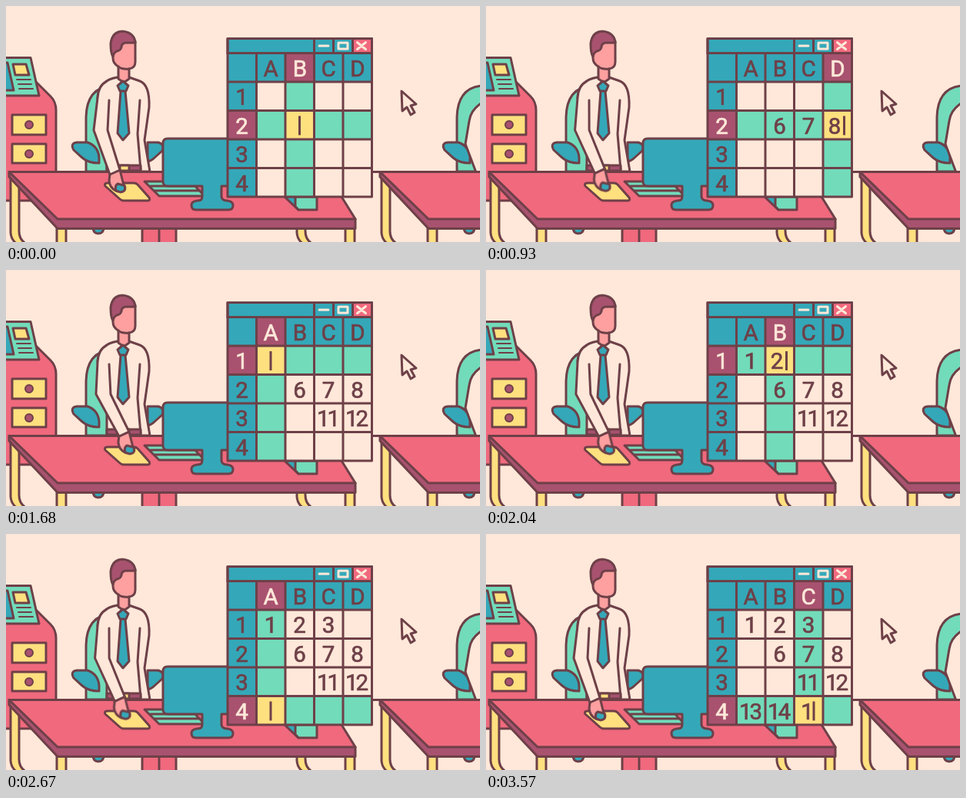
Animation of 616x308 px, one loop 3600 ms. Source, as an HTML page without scripts:

```html
<!DOCTYPE html>
<html lang="en">
<head>
<meta charset="utf-8">
<title>Office spreadsheet</title>
<style>
  @property --slot { syntax: "<number>"; inherits: true; initial-value: 0; }
  @property --typed { syntax: "<number>"; inherits: true; initial-value: 0; }
  @property --col { syntax: "<number>"; inherits: true; initial-value: 1; }
  @property --row { syntax: "<number>"; inherits: true; initial-value: 1; }
  @property --caret { syntax: "<number>"; inherits: true; initial-value: 9; }

  :root {
    --paper: #ffe8d9; --ink: #6e4048; --red: #f0697d; --teal: #34a8b8;
    --mint: #72dbba; --yellow: #ffe07f; --plum: #a8526f; --skin: #ff a0a0;
    --skin: #fda09f; --tone: var(--ink);
    --loop: 3.6s; --cell: 37.5px;
  }
  html, body { margin: 0; width: 100%; height: 100%; overflow: hidden; background: var(--paper); }
  svg { display: block; }
  .stage { width: 100%; height: 100%; stroke: var(--ink); stroke-width: 3; stroke-linejoin: round; stroke-linecap: round; fill: none; }
  .paper { fill: var(--paper); } .red { fill: var(--red); } .teal { fill: var(--teal); }
  .mint { fill: var(--mint); } .yellow { fill: var(--yellow); } .plum { fill: var(--plum); }
  .skin { fill: var(--skin); } .flat { stroke: none; } .light { stroke: var(--paper); }

  text { font: 29.5px Roboto, "Open Sans", sans-serif; fill: var(--tone); stroke: var(--tone); stroke-width: .7; text-anchor: middle; }
  .picked { --tone: var(--paper); }

  /* Each of the eleven slots fills one cell. */
  .sheet {
    animation: slot var(--loop) steps(11) infinite,
               cell var(--loop) step-end infinite,
               typed calc(var(--loop) / 11) step-end infinite;
  }
  .column { transform: translateX(calc(var(--col) * var(--cell))); }
  .column .strip { transform: translateX(calc(var(--col) * -1 * var(--cell))); }
  .row { transform: translateY(calc(var(--row) * var(--cell))); }
  .row .strip { transform: translateY(calc(var(--row) * -1 * var(--cell))); }
  .active { transform: translate(calc((var(--col) + 1) * var(--cell)), calc((var(--row) + 1) * var(--cell))); }
  .caret { transform: translateX(calc(var(--typed) * var(--caret) * 1px)); }
  .draft text { opacity: calc(var(--typed) * clamp(0, 1 - max(var(--slot) - var(--i), var(--i) - var(--slot)), 1)); }
  .done text { opacity: clamp(0, var(--slot) - var(--i), 1); }
  .pair { letter-spacing: -3.2px; }

  @keyframes slot { from { --slot: 0; } to { --slot: 11; } }
  @keyframes typed { 0% { --typed: 0; } 23%, 100% { --typed: 1; } }
  @keyframes cell {
    0% { --col: 1; --row: 1; --caret: 9; }
    9.09% { --col: 2; --row: 1; --caret: 9; }
    18.18% { --col: 3; --row: 1; --caret: 9; }
    27.27% { --col: 2; --row: 2; --caret: 7; }
    36.36% { --col: 3; --row: 2; --caret: 7; }
    45.45% { --col: 0; --row: 0; --caret: 7; }
    54.54% { --col: 1; --row: 0; --caret: 9; }
    63.63% { --col: 2; --row: 0; --caret: 9; }
    72.72% { --col: 0; --row: 3; --caret: 7; }
    81.81% { --col: 1; --row: 3; --caret: 7; }
    90.9%, 100% { --col: 2; --row: 3; --caret: 7; }
  }

  .sleeve, .hand { animation: calc(var(--loop) / 2) ease-in-out infinite alternate; }
  .sleeve { animation-name: reach; }
  .hand { animation-name: slide; }
  @keyframes reach {
    from { d: path("M130 99Q120 104 119 120L114 162L135 220L148 214L132 162L134 123"); }
    to { d: path("M130 99Q120 104 119 120L117 162L147 217L160 211L136 162L134 123"); }
  }
  @keyframes slide { to { transform: translate(12px, -3px); } }
</style>
</head>
<body>
<svg class="stage" viewBox="0 0 616 308">
  <defs>
    <g id="chair">
      <path class="mint" d="M104 216V145Q105 107 136 104H160V216Z"/>
      <path class="teal" d="M92 178H106Q120 183 121 198V205Q107 205 99 198L88 188Q83 179 92 178Z"/>
    </g>
    <path id="back-leg" class="yellow" d="M6 220V296Q7 308 19 313H32Q17 308 17 294V220Z"/>
    <g id="desk">
      <path class="teal" d="M113 288Q113 297 120 297Q127 297 127 288Z"/>
      <use href="#back-leg"/>
      <use href="#back-leg" x="372"/>
      <path class="yellow" d="M66 284H78V312H66ZM441 284H453V312H441Z"/>
      <path class="plum" d="M4 216.5V223L67 290.5H454V278Z"/>
      <path class="red" d="M4 216.5H416L454 278H67Z"/>
    </g>
    <g id="letters"><text x="56" y="30">A</text><text x="94" y="30">B</text><text x="131" y="30">C</text><text x="169" y="30">D</text></g>
    <g id="digits"><text x="18.5" y="67.5">1</text><text x="18.5" y="105">2</text><text x="18.5" y="142.5">3</text><text x="18.5" y="180">4</text></g>
  </defs>

  <path d="M0 216.5H616"/>

  <!-- cabinet -->
  <path class="red" d="M-4 94H34L58 118Q65 125 65 136V254H-4Z"/>
  <path class="mint" d="M-4 67.5H32L43 117H-4Z"/>
  <path class="teal" d="M-4 74H2L10 110H-4Z"/>
  <path class="yellow" d="M9 76H26L30 90H12Z"/>
  <path stroke-width="2" d="M14 96H32M16 102H33M17 108H35"/>
  <path class="yellow" d="M8 142H52V168H8ZM8 180H52V205H8Z"/>
  <g class="plum" stroke-width="2"><circle cx="30" cy="155" r="5"/><circle cx="30" cy="193" r="5"/></g>

  <!-- worker -->
  <use href="#chair"/>
  <path class="teal" d="M184 178H198Q207 181 203 189L193 198Q189 202 184 203Z"/>
  <path class="red" d="M177 286H221V312H177ZM199 286V312"/>
  <path class="paper" d="M145 93Q120 97 119 120L131 160V216H187L180 175L186 132Q187 103 174 98L160 93Z"/>
  <path d="M174 123L171 167L175 214"/>
  <path class="plum" d="M131 208H175V215H131Z"/>
  <path class="yellow" d="M148 208H160V215H148Z"/>
  <path class="skin" d="M139 58V68Q139 75 146 79V95L153 100L160 95V82Q168 81 168 73V46H148Z"/>
  <path d="M146 79Q150 83 160 82"/>
  <path class="plum" d="M139 66Q136 62 136 49Q138 33 152 33Q167 35 168 48H155Q150 49 150 54Q149 58 144 59Q140 61 139 66Z"/>
  <path class="teal" d="M149 111H155L160 166L152 175L145 166ZM145 104L152 98L159 104L156 111H148Z"/>

  <!-- neighbour -->
  <use href="#chair" x="482"/>
  <path class="paper" d="M622 124Q604 134 602 150L597 180L612 220H622Z"/>

  <use href="#desk"/>
  <use href="#desk" x="482"/>

  <path class="yellow" d="M132 231H166Q169 231 171 233L186 250Q188 254 184 254H153Q150 254 148 252L129 235Q127 231 132 231Z"/>
  <path class="mint" d="M180 229H240L258 248H199ZM188 235H246M193 241H252"/>
  <path class="mint" d="M364 249H404V266H380Z"/>
  <path class="teal" d="M362 249H376V262L380 266Z"/>
  <path class="teal" d="M210 173H330V235H280V249Q281 254 287 254Q295 255 295 260Q295 266 289 266H247Q241 266 241 260Q241 255 249 254Q255 254 255 249V235H210Q204 235 204 229V179Q204 173 210 173Z"/>

  <g class="hand">
    <path class="teal" d="M136 231Q139 242 149 243Q157 242 154 234L146 230Z"/>
    <path class="skin" d="M135 219L148 214L153 234L145 232Q141 235 143 241Q135 238 134 228Z"/>
  </g>
  <path class="paper sleeve" d="M130 99Q120 104 119 120L114 162L135 220L148 214L132 162L134 123"/>

  <!-- spreadsheet window -->
  <path class="teal" d="M288 42.5H475.5V61.5H288Z"/>
  <path class="red" d="M450.5 42.5H475.5V61.5H450.5Z"/>
  <path d="M400.5 42.5V61.5M425.5 42.5V61.5"/>
  <path class="light" d="M407 52H419M432 48H444V56H432ZM456.5 47.5L467.5 56.5M467.5 47.5L456.5 56.5"/>

  <g class="sheet" transform="translate(288 61.5)">
    <g class="flat">
      <path class="teal" d="M0 0H187.5V37.5H37.5V187.5H0Z"/>
      <path class="paper" d="M37.5 37.5H187.5V187.5H37.5Z"/>
    </g>
    <use href="#letters"/>
    <use href="#digits"/>

    <g class="column picked">
      <path class="mint flat" d="M37.5 37.5H75V187.5H37.5Z"/>
      <path class="plum flat" d="M37.5 0H75V37.5H37.5Z"/>
      <svg x="37.5" width="37.5" height="37.5" viewBox="37.5 0 37.5 37.5">
        <use class="strip" href="#letters"/>
      </svg>
    </g>
    <g class="row picked">
      <path class="mint flat" d="M37.5 37.5H187.5V75H37.5Z"/>
      <path class="plum flat" d="M0 37.5H37.5V75H0Z"/>
      <svg y="37.5" width="37.5" height="37.5" viewBox="0 37.5 37.5 37.5">
        <use class="strip" href="#digits"/>
      </svg>
    </g>

    <g class="active">
      <path class="yellow flat" d="M0 0H37.5V37.5H0Z"/>
      <path class="caret" d="M18.5 7V32" stroke-linecap="butt"/>
      <g class="draft">
        <text x="15" y="30" style="--i:0">6</text>
        <text x="15" y="30" style="--i:1">7</text>
        <text x="15" y="30" style="--i:2">8</text>
        <text x="17" y="30" style="--i:3">1</text>
        <text x="17" y="30" style="--i:4">1</text>
        <text x="17" y="30" style="--i:5">1</text>
        <text x="15" y="30" style="--i:6">2</text>
        <text x="15" y="30" style="--i:7">3</text>
        <text x="17" y="30" style="--i:8">1</text>
        <text x="17" y="30" style="--i:9">1</text>
        <text x="17" y="30" style="--i:10">1</text>
      </g>
    </g>

    <g class="done">
      <text x="93.5" y="105" style="--i:0">6</text>
      <text x="131" y="105" style="--i:1">7</text>
      <text x="168.5" y="105" style="--i:2">8</text>
      <text class="pair" x="129.5" y="142.5" style="--i:3">11</text>
      <text class="pair" x="166.5" y="142.5" style="--i:4">12</text>
      <text x="56" y="67.5" style="--i:5">1</text>
      <text x="93.5" y="67.5" style="--i:6">2</text>
      <text x="131" y="67.5" style="--i:7">3</text>
      <text class="pair" x="54.5" y="180" style="--i:8">13</text>
      <text class="pair" x="91.5" y="180" style="--i:9">14</text>
    </g>

    <path d="M0 0H187.5V187.5H0ZM37.5 0V187.5M75 0V187.5M112.5 0V187.5M150 0V187.5M0 37.5H187.5M0 75H187.5M0 112.5H187.5M0 150H187.5"/>
  </g>
  <path d="M288 42.5H475.5V61.5H288Z"/>

  <path class="paper" d="M514 111L515 137L521 132L526 142L531 139L526 130L533 128Z"/>
</svg>
</body>
</html>
```
